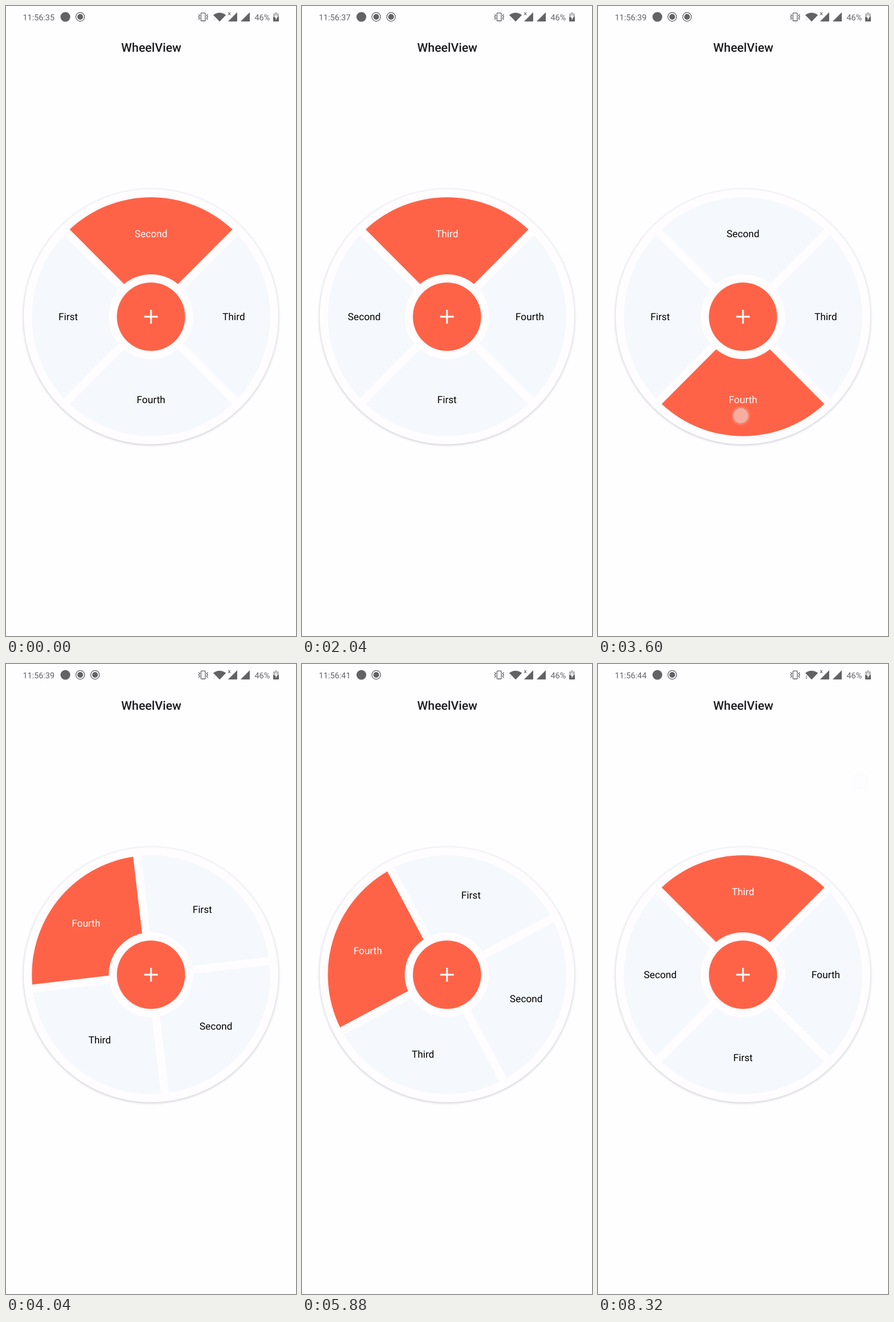
Recreate the animation shown at these times as an HTML page. Size 508 by 1101 pixels, loop 8.72 s.

```html
<!DOCTYPE html>
<html lang="en">
<head>
<meta charset="utf-8">
<title>WheelView</title>
<style>
  html, body { margin: 0; width: 100%; height: 100%; overflow: hidden; background: #fefdff; }
  svg { display: block; width: 508px; height: 1101px; font-family: Roboto, sans-serif; text-rendering: geometricPrecision; }
  #wheel { filter: drop-shadow(0 1px 2px rgba(0, 0, 0, .24)); }
  .label { font-size: 17.2px; text-anchor: middle; }
  .status { font-size: 14.4px; fill: #626265; }
</style>
</head>
<body>
<svg viewBox="0 0 508 1101">
  <rect width="508" height="1101" fill="#fefdff"/>

  <g class="status">
    <text id="clock" x="29.5" y="24.6"></text>
    <circle cx="104" cy="19" r="8.6"/>
    <g id="rec">
      <circle r="7.6" fill="none" stroke="#626265" stroke-width="1.3"/>
      <circle r="5"/>
    </g>
    <use id="rec2" href="#rec"/>
    <g fill="none" stroke="#626265" stroke-width="1.3">
      <rect x="341.5" y="12.2" width="7.6" height="13.8" rx="1"/>
      <path d="M337.4 14.5l2 2.3-2 2.3 2 2.3-2 2.3M353.4 14.5l-2 2.3 2 2.3-2 2.3 2 2.3"/>
    </g>
    <path d="M363 15.8Q374 7.6 385.300 15.8L374.200 27.200Z"/>
    <path id="net" d="M363.400 22.600l1.700-2 1.700 2zM363.400 24.200h3.400l-1.700 2z"/>
    <path d="M405 11v16h-16zM427 11v16h-16z"/>
    <path d="M389.200 11l4 5M393.200 11l-4 5" stroke="#626265" stroke-width="1.2"/>
    <text x="435.500" y="24.600">46%</text>
    <path d="M468 13h3v-2h4v2h3v6h-10z" fill="#bdbdc0"/>
    <path d="M468 19h10v8h-10z"/>
    <path d="M473.800 14l-3.600 6.200h2.300v4.600l3.600-6.200h-2.300z" fill="#fefdff"/>
  </g>

  <text x="254.500" y="80" font-size="21.300" font-weight="500" text-anchor="middle" fill="#1c1b1f">WheelView</text>

  <circle id="wheel" cx="254" cy="543" r="223" fill="#fffdff"/>
  <g id="sectors"></g>
  <circle cx="254" cy="543" r="59.800" fill="#ff6347"/>
  <path d="M242 543h24M254 531v24" stroke="#fffdff" stroke-width="3"/>
  <g id="touch">
    <circle r="16.800" fill="#fff" fill-opacity=".13"/>
    <circle r="13.400" fill="#eee" fill-opacity=".46" stroke="#999" stroke-opacity=".28"/>
  </g>
</svg>
<script>
const LOOP = 8720, LAST = 8320, STEP = 40, TURN = 400;
const CX = 254, CY = 543, R_OUT = 208.7, R_IN = 74, R_LABEL = 145, HALF_GAP = 7.1;
const NAMES = ['First', 'Second', 'Third', 'Fourth'];
const TICKS = [280, 1280, 2280, 3320, 4280, 5280, 6320, 7320, 8280];

// Each tap: finger down, start of the turn, chosen sector, turn in degrees, place
const TAPS = [
  { down: 1360, go: 1632, pick: 2, turn: -90, x: 421, y: 571 },
  { down: 2520, go: 2746, pick: 1, turn: 90, x: 92, y: 575 },
  { down: 3480, go: 3784, pick: 3, turn: 180, x: 250, y: 716 },
  { down: 4600, go: 4750, pick: 0, turn: -90, x: 418, y: 574 },
  { down: 5600, go: 5766, pick: 3, turn: 90, x: 92, y: 575 },
  { down: 6760, go: 6950, pick: 2, turn: 90, x: 92, y: 575 },
  { down: 8040, go: 8235, pick: 2, turn: 0, x: 459, y: 205 }
];

const $ = id => document.getElementById(id);
const clamp = v => Math.max(0, Math.min(1, v));
const ease = v => (1 - Math.cos(Math.PI * clamp(v))) / 2;

function make(tag, attrs) {
  const el = document.createElementNS('http://www.w3.org/2000/svg', tag);
  for (const k in attrs) el.setAttribute(k, attrs[k]);
  return $('sectors').appendChild(el);
}

function sectorPath() {
  const at = (r, side) => {
    const a = Math.PI / 4 - Math.asin(HALF_GAP / r);
    return (side * r * Math.sin(a)).toFixed(2) + ' ' + (-r * Math.cos(a)).toFixed(2);
  };
  return `M${at(R_OUT, -1)}A${R_OUT} ${R_OUT} 0 0 1 ${at(R_OUT, 1)}` +
    `L${at(R_IN, 1)}A${R_IN} ${R_IN} 0 0 0 ${at(R_IN, -1)}Z`;
}

const shape = sectorPath();
const sectors = NAMES.map(() => make('path', { d: shape }));
const labels = NAMES.map(name => {
  const el = make('text', { class: 'label' });
  el.textContent = name;
  return el;
});
$('rec').setAttribute('transform', 'translate(130 19)');

function drawWheel(t) {
  let rot = 0, pick = 1;
  for (const tap of TAPS) {
    rot += tap.turn * ease((t - tap.go) / TURN);
    if (t >= tap.down + STEP) pick = tap.pick;
  }
  NAMES.forEach((_, i) => {
    const deg = rot + (i - 1) * 90, a = deg * Math.PI / 180;
    sectors[i].setAttribute('transform', `translate(${CX} ${CY}) rotate(${deg})`);
    sectors[i].setAttribute('fill', i === pick ? '#ff6347' : '#f5f8fd');
    labels[i].setAttribute('x', CX + R_LABEL * Math.sin(a));
    labels[i].setAttribute('y', CY + 6 - R_LABEL * Math.cos(a));
    labels[i].setAttribute('fill', i === pick ? '#fffdff' : '#000');
  });
}

function drawTouch(t) {
  const tap = TAPS.find(p => t >= p.down && t < p.go + 100);
  $('touch').setAttribute('opacity', tap ? 1 - clamp((t - tap.go) / 100) : 0);
  if (tap) $('touch').setAttribute('transform', `translate(${tap.x} ${tap.y})`);
}

function drawStatus(t) {
  $('clock').textContent = '11:56:' + (35 + TICKS.filter(k => t >= k).length);
  const shown = ease((t - 160) / 280) * (1 - ease((t - 4760) / 240));
  $('rec2').setAttribute('opacity', shown);
  $('rec2').setAttribute('transform', `translate(156 19) scale(${shown}) translate(-130 -19)`);
  $('net').setAttribute('fill', t >= 8000 ? '#626265' : '#d6d6d9');
}

function draw(now) {
  const t = Math.min(LAST, Math.floor(now % LOOP / STEP) * STEP);
  drawWheel(t);
  drawTouch(t);
  drawStatus(t);
}

function frame() {
  draw(performance.now());
  requestAnimationFrame(frame);
}
frame();
</script>
</body>
</html>
```
